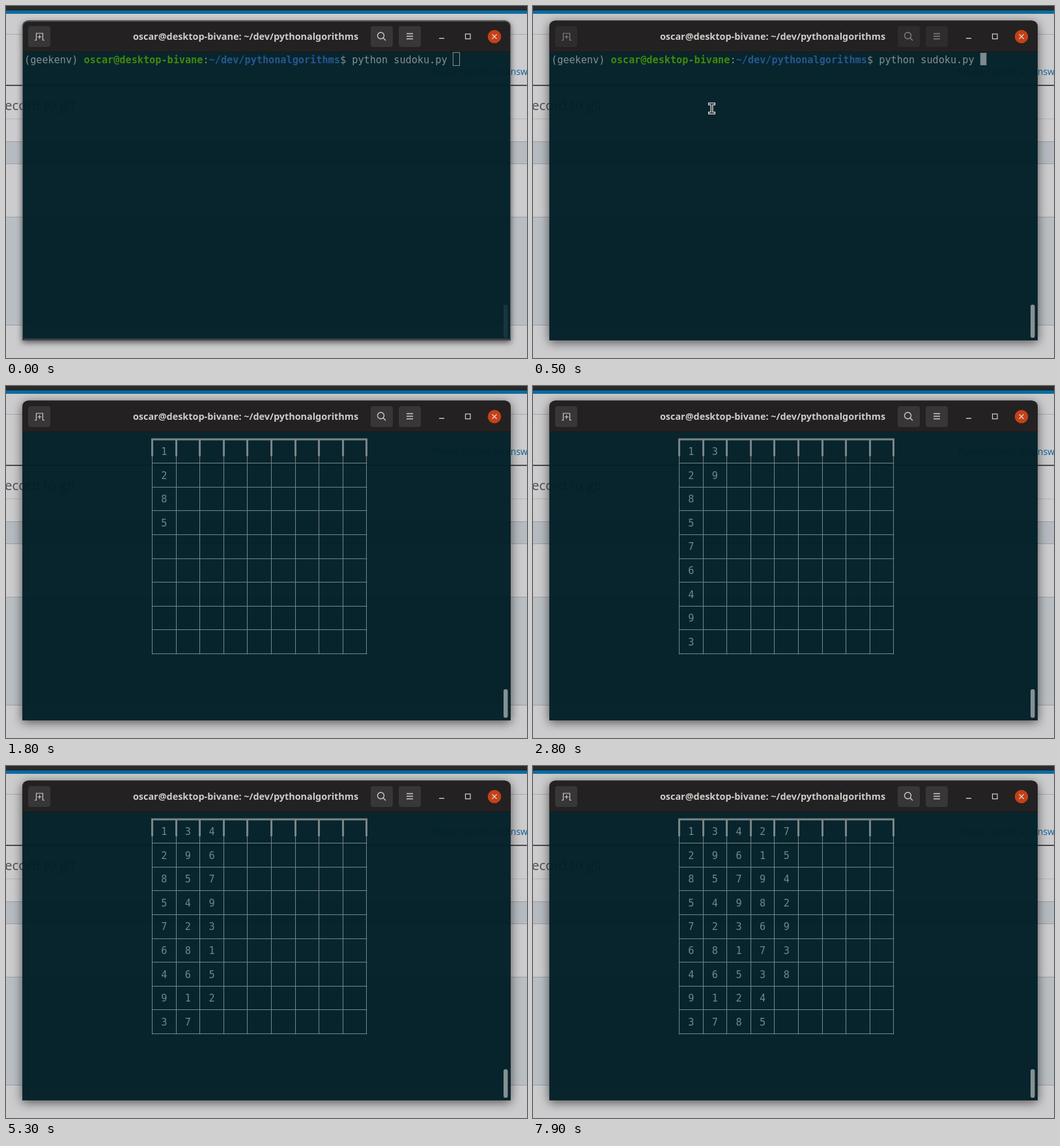
An HTML page with a canvas that plays this animation: 800x541 px, repeating every 8000 ms.

```html
<!DOCTYPE html>
<html lang="en">
<head>
<meta charset="utf-8">
<title>Sudoku in a terminal</title>
<style>
html, body { margin: 0; width: 100%; height: 100%; overflow: hidden; background: #cbcacc; }
canvas { display: block; }
</style>
</head>
<body>
<canvas id="stage" width="800" height="541"></canvas>
<script>
const ctx = document.getElementById('stage').getContext('2d');
const LOOP = 8000, TICK = 100;
const FOCUS_AT = 200, GRID_AT = 1000, FIRST_DIGIT = 1196, DIGIT_STEP = 158;
const MONO = '15.2px "DejaVu Sans Mono", monospace';
const CHAR_W = 9.15;
const HOST = 'oscar@desktop-bivane';
const PATH = '~/dev/pythonalgorithms';
// Solved cells, column by column
const DIGITS = '128576493' + '395428617' + '467931528' + '219867345' + '7542938';
const GRID = { x: 224.5, y: 82, cell: 36.6 };

function rect(x, y, w, h, color) {
  ctx.fillStyle = color;
  ctx.fillRect(x, y, w, h);
}

function round(x, y, w, h, r, color) {
  ctx.fillStyle = color;
  ctx.beginPath();
  ctx.roundRect(x, y, w, h, r);
  ctx.fill();
}

function text(str, x, y, font, color, align = 'left') {
  ctx.font = font;
  ctx.fillStyle = color;
  ctx.textAlign = align;
  ctx.fillText(str, x, y);
}

function lines(color, width, ...paths) {
  ctx.strokeStyle = color;
  ctx.lineWidth = width;
  ctx.beginPath();
  for (const [x, y, ...rest] of paths) {
    ctx.moveTo(x, y);
    for (let i = 0; i < rest.length; i += 2) ctx.lineTo(rest[i], rest[i + 1]);
  }
  ctx.stroke();
}

function drawPage() {
  rect(0, 0, 800, 541, '#cccbcd');
  rect(0, 0, 800, 7, '#2a2a2b');
  rect(0, 7, 800, 5, '#086da5');
  rect(0, 43, 800, 1, '#a9a9ac');
  rect(0, 121, 800, 2, '#4c4d50');
  rect(0, 173, 800, 1, '#b6b4b5');
  rect(0, 208, 800, 34, '#b5bbc1');
  rect(0, 325, 800, 165, '#b9bec3');
  for (const y of [208, 242, 324, 490]) rect(0, y, 800, 1, '#989fa6');
  text('ecord to gif', -2, 160, '20.5px "Open Sans", sans-serif', '#4d4d50');
  text('Please submit an answ', 801, 106, '14px "Open Sans", sans-serif', '#0c619b', 'right');
}

function drawFrame(focused) {
  ctx.save();
  ctx.shadowColor = 'rgba(0,0,0,.6)';
  ctx.shadowBlur = focused ? 16 : 10;
  ctx.shadowOffsetY = 3;
  // Keep the shadow outside, so the page shows faintly through the terminal
  ctx.beginPath();
  ctx.rect(0, 0, 800, 541);
  ctx.rect(25, 30, 750, 484);
  ctx.clip('evenodd');
  round(25, 22.5, 750, 491.5, [9, 9, 0, 0], '#242122');
  ctx.restore();

  rect(25, 70, 750, 444, 'rgba(0,31,39,.96)');
  round(25, 22.5, 750, 48, [9, 9, 0, 0], '#242122');
  rect(25, 70, 750, 1, '#171819');
  rect(25, 71, 1, 443, '#14272c');
  rect(774, 71, 1, 443, '#14272c');
  rect(25, 513, 750, 1, '#18282c');

  if (!focused) {
    ctx.strokeStyle = '#5c6164';
    ctx.lineWidth = 1;
    ctx.beginPath();
    ctx.roundRect(25.5, 23.5, 749, 490, [9, 9, 0, 0]);
    ctx.stroke();
    rect(25, 511, 750, 3, '#3a4346');
  }
}

function drawHeader(dim) {
  const face = dim ? '#2f2c2d' : '#393637';
  const icon = dim ? '#858382' : '#cfcdca';
  for (const x of [34, 560, 603]) round(x, 31, 34, 32, 4, face);

  lines(icon, 1.2,
    [44, 52.5, 46.5, 52.5, 46.5, 42, 56.5, 42, 56.5, 52.5, 59, 52.5],
    [51.5, 44.5, 51.5, 50.5], [48.5, 47.5, 54.5, 47.5]);

  ctx.lineWidth = 1.3;
  ctx.beginPath();
  ctx.arc(575.5, 45.5, 5, 0, 7);
  ctx.stroke();
  lines(icon, 1.5, [579, 49, 583, 53]);
  lines(icon, 1.3, [615, 42.5, 625, 42.5], [615, 46.5, 625, 46.5], [615, 50.5, 625, 50.5]);

  rect(665, 49, 8, 1.3, '#d5d3d0');
  ctx.strokeStyle = '#d5d3d0';
  ctx.lineWidth = 1.2;
  ctx.strokeRect(705.5, 43, 7.5, 7.5);

  ctx.fillStyle = '#c34118';
  ctx.beginPath();
  ctx.arc(750, 47, 10.3, 0, 7);
  ctx.fill();
  lines('#e5d8d2', 1.3, [746.5, 43.5, 753.5, 50.5], [753.5, 43.5, 746.5, 50.5]);

  text(`${HOST}: ${PATH}`, 368, 52, 'bold 14.4px "Noto Sans", sans-serif', '#cfcdc9', 'center');
}

function drawPrompt(focused) {
  let col = 0;
  const put = (str, color, weight = '') => {
    text(str, 28 + col * CHAR_W, 88, `${weight} ${MONO}`, color);
    col += str.length;
  };
  put('(geekenv) ', '#84908f');
  put(HOST, '#43890a', 'bold');
  put(':', '#84908f');
  put(PATH, '#285690', 'bold');
  put('$ python sudoku.py ', '#84908f');

  const x = 28 + col * CHAR_W;
  if (focused) {
    rect(x, 72, 9.5, 19, '#7e8b8d');
  } else {
    ctx.strokeStyle = '#84908f';
    ctx.lineWidth = 1;
    ctx.strokeRect(686.5, 71.5, 10, 20);
  }
}

function drawGrid(count) {
  const { x, y, cell } = GRID, size = cell * 9, color = '#75858a';
  for (let i = 0; i <= 9; i++) {
    const gx = Math.floor(x + i * cell), gy = Math.floor(y + i * cell);
    rect(gx, y, 1, size + 1, color);
    if (i) rect(Math.floor(x), gy, size + 1, 1, color);
    rect(gx - 1, 81, 3, 27, '#7b8586');
  }
  rect(223, 80.5, 332, 3, '#7b8586');

  for (let i = 0; i < count; i++) {
    const cx = x + (Math.floor(i / 9) + 0.5) * cell;
    text(DIGITS[i], cx, 106 + (i % 9) * cell, MONO, '#76858a', 'center');
  }
}

function drawPointer(x, y) {
  const shape = [[x - 3.5, y - 7, x + 3.5, y - 7], [x, y - 7, x, y + 7], [x - 3.5, y + 7, x + 3.5, y + 7]];
  ctx.lineCap = 'square';
  lines('#e6e8e8', 4, ...shape);
  lines('#15191a', 1.4, ...shape);
  ctx.lineCap = 'butt';
}

function render(time) {
  const t = Math.floor((time + 5) / TICK) * TICK % LOOP;
  const focused = t >= FOCUS_AT, solving = t >= GRID_AT;
  drawPage();
  drawFrame(focused);
  drawHeader(focused && !solving);
  if (solving) {
    const count = Math.floor((t - FIRST_DIGIT) / DIGIT_STEP) + 1;
    drawGrid(Math.max(0, Math.min(count, DIGITS.length)));
  } else {
    drawPrompt(focused);
    if (focused) drawPointer(274.5, 157.5);
  }
  const top = solving ? 466 : 459;
  round(764, top, 6.5, 510 - top, 3, focused ? '#859092' : '#19363d');
}

function loop() {
  render(performance.now());
  requestAnimationFrame(loop);
}
loop();
</script>
</body>
</html>
```
